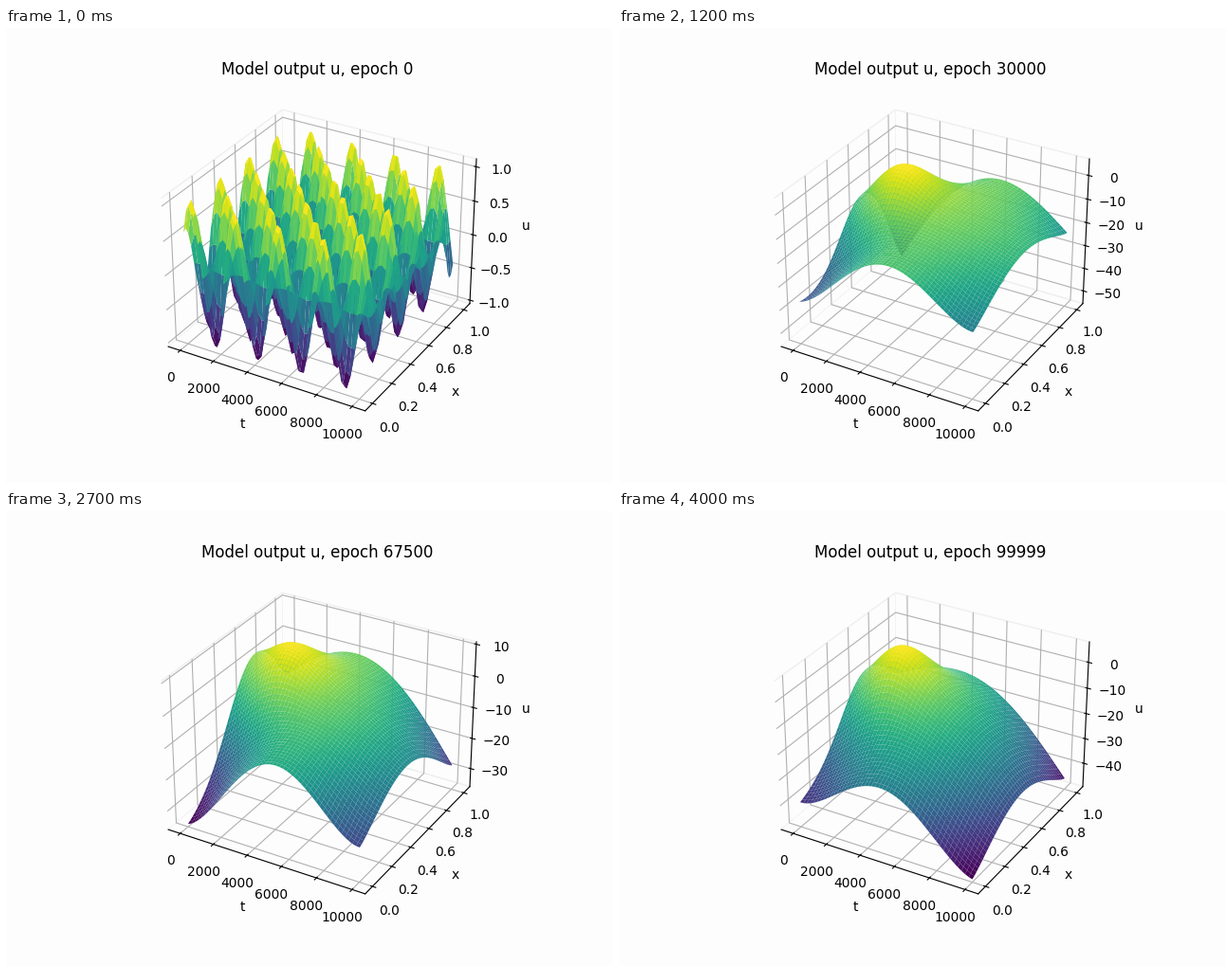
Animation, 640 px wide and 480 px high, one loop 4100 ms. Source, as a matplotlib script:

```python
import numpy as np
import matplotlib.pyplot as plt
from matplotlib.animation import FuncAnimation

FRAMES, STEP = 41, 2500
PAPER = "#fdfdfd"
plt.rcParams.update({"figure.facecolor": PAPER, "axes.facecolor": PAPER})

unit = np.linspace(0, 1, 50)
T, X = np.meshgrid(unit, unit, indexing="ij")

# Untrained state: an egg-crate wave
wave = .03 + 1.04 * (np.cos(2 * np.pi * (T - .038) / .25)
                     * np.cos(2 * np.pi * (X - .015) / .272))

# Key moments: step -> crest height, then the corners left, back, front, right
KEYS = {
    7: (4.1, -28.7, -54.4, -37.7, -39.8),
    12: (4.9, -37.3, -54.5, -27.5, -23.3),
    19: (1.8, -37.6, -65, -26.9, -38.6),
    27: (9, -35.1, -13, -25, -28),
    32: (6.4, -45.7, -17, -42, -19.7),
    40: (6.2, -39.7, -21, -48.4, -45.1),
}
steps = list(KEYS)
tracks = list(zip(*KEYS.values()))
PEAK = (.25, .55)
bump = np.exp(-((T - PEAK[0])**2 + (X - PEAK[1])**2) / .05)
peak_at = tuple(round(p * (len(unit) - 1)) for p in PEAK)


def arch(s, skew=1, power=1.5):
    return np.abs(np.sin(np.pi * s**skew))**power


def sheet(crest, left, back, front, right, lift):
    """Plateau that falls off to four arched edges hung between the corners."""
    plateau = crest - .15 * (crest - min(left, back, front, right))

    def edge(a, b, s, rise, **shape):
        line = a + (b - a) * s
        return line + rise * lift * (crest - (a + b) / 2) * arch(s, **shape) - plateau

    near_t, far_t = (1 - T)**3, T**3
    near_x, far_x = (1 - X)**3, X**3
    z = plateau + (
        edge(left, front, T, .52, power=1.6) * near_x
        + edge(back, right, T, .6, power=1) * far_x
        + edge(left, back, X, .55, skew=1.6, power=1.3) * near_t
        + edge(front, right, X, .33, power=1.2) * far_t
        - (left - plateau) * near_t * near_x
        - (back - plateau) * near_t * far_x
        - (front - plateau) * far_t * near_x
        - (right - plateau) * far_t * far_x)
    return z + (crest - z[peak_at]) * bump


def trained(i):
    crest, left, back, front, right = (np.interp(i, steps, track) for track in tracks)
    # The front corner sags between key moments, up to the last stretch
    if i < steps[-2]:
        phase = np.interp(i, steps, range(len(steps)))
        front -= 15 * np.sin(np.pi * phase)**2
    lift = 1.1 - .35 * np.clip((i - 27) / 8, 0, 1)
    return sheet(crest, left, back, front, right, lift)


def heights(i):
    if i == 0:
        return wave
    growth = min(1, i / steps[0])**.6
    fading = np.exp(-i) if i < steps[0] else 0
    return trained(i) * growth + wave * fading


fig = plt.figure(figsize=(6.4, 4.8), dpi=100)
ax = fig.add_subplot(projection="3d")


def draw(i):
    ax.clear()
    for axis in (ax.xaxis, ax.yaxis, ax.zaxis):
        axis.pane.set_alpha(1)
        axis.pane.set_facecolor(PAPER)
        axis.pane.set_edgecolor("#efefef")
    ax.plot_surface(T * 10000, X, heights(i), cmap="viridis")
    ax.zaxis.get_major_locator().set_params(nbins=8)
    ax.set(xlabel="t", ylabel="x", zlabel="u")
    ax.set_title(f"Model output u, epoch {min(i * STEP, 99999)}")
    return []


anim = FuncAnimation(fig, draw, frames=FRAMES, interval=100,
                     init_func=lambda: [], repeat=True)
plt.show()
```
